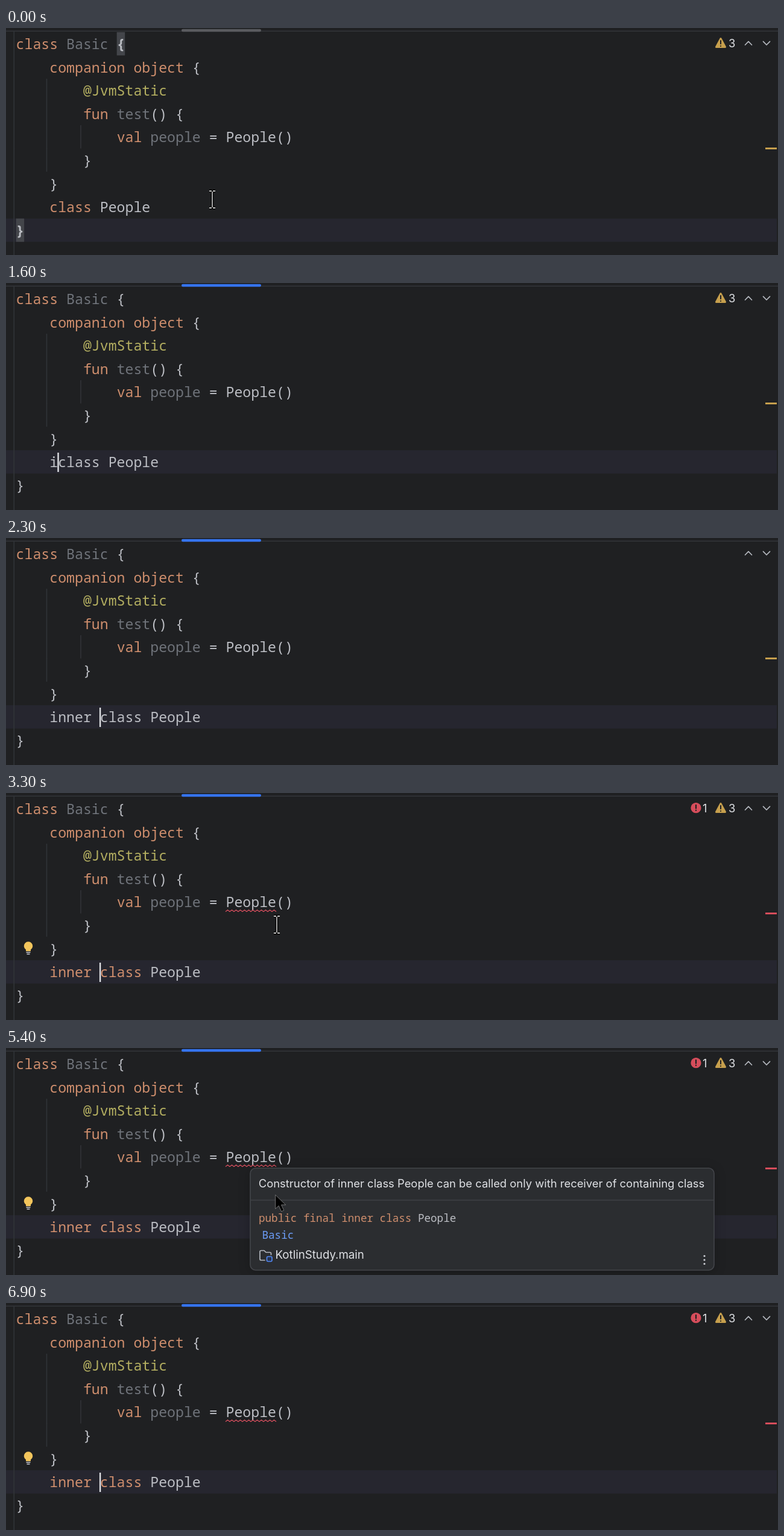
Recreate the animation shown at these times as an HTML page. Size 1280 px wide and 376 px high, loop 7100 ms.

```html
<!DOCTYPE html>
<html lang="en">
<head>
<meta charset="utf-8">
<title>Editor</title>
<style>
  html, body { margin: 0; width: 100%; height: 100%; overflow: hidden; background: #1f2022; }
  svg { display: block; width: 100vw; height: 100vh; }
  text { white-space: pre; fill: #bcbec4; }
  .code { font: 23.2px "Noto Sans Mono", "DejaVu Sans Mono", monospace; }
  .doc { font: 17.6px "Noto Sans Mono", "DejaVu Sans Mono", monospace; }
  .ui { font: 18.4px Inter, "Open Sans", sans-serif; fill: #dfe1e5; }
  .module { font-size: 18.7px; }
  .bold { font-weight: bold; }
  .k { fill: #cf8e6d; }
  .u { fill: #6f737a; }
  .a { fill: #b3ae60; }
  .b { fill: #548af7; }
  .guide { stroke: #313438; stroke-width: 1.6; }
  .popup { fill: #2b2d30; stroke: #43454a; stroke-width: 1.6; filter: drop-shadow(0 3px 9px rgba(0, 0, 0, .22)); }
  .line { fill: none; stroke: #b4b8bf; stroke-width: 1.7; stroke-linecap: round; stroke-linejoin: round; }
</style>
</head>
<body>
<svg viewBox="0 0 1280 376">
  <rect width="1280" height="376" fill="#1f2022"/>
  <rect id="row" width="1278" height="38.6" fill="#26262f"/>
  <path class="guide" d="M13.3 6V376M67.5 84V238M124 161V199.5"/>
  <rect y="4.5" width="1280" height="1.2" fill="#393b40"/>
  <rect id="tab" x="291" y="1.7" width="132" height="4.6" rx="2.2"/>
  <g id="braces" fill="#43454a">
    <rect x="183.7" y="6.8" width="13.5" height="38.6"/>
    <rect x="16.6" y="315.6" width="13.5" height="38.6"/>
  </g>
  <g id="code" class="code"></g>
  <polyline id="squiggle" fill="none" stroke="#db4f5f" stroke-width="1.2"/>
  <rect id="caret" y="281" width="2.4" height="32" fill="#dfe1e5"/>
  <rect id="stripe" x="1259" y="198" width="19" height="3"/>

  <g id="errors">
    <circle cx="1144" cy="24.7" r="8.6" fill="#d64d5b"/>
    <path d="M1144 20V25.5M1144 28.7V29" stroke="#1f2022" stroke-width="2.2" stroke-linecap="round"/>
    <text class="ui" x="1155" y="31.5">1</text>
  </g>
  <g id="warnings">
    <path d="M1185 17.5L1192.5 31.5H1177.5Z" fill="#c69f4d" stroke="#c69f4d" stroke-width="3" stroke-linejoin="round"/>
    <path d="M1185 21V26.3M1185 29.7V30" stroke="#1f2022" stroke-width="2" stroke-linecap="round"/>
    <text class="ui" x="1198" y="31.5">3</text>
  </g>
  <path class="line" d="M1225.5 28L1231 22.3L1236.5 28M1255.5 22.3L1261 28L1266.5 22.3"/>

  <g id="bulb">
    <path d="M33 262V259.5A7.2 7.2 0 1 1 41 259.5V262Z" fill="#f2c55c"/>
    <path d="M33.5 264H40.5M34.5 266.8H39.5" stroke="#ced0d6" stroke-width="1.5"/>
  </g>

  <g id="completion">
    <rect class="popup" x="34" y="315.5" width="843.5" height="90" rx="9"/>
    <rect x="39" y="320" width="833" height="34.5" rx="5.5" fill="#45464a"/>
    <text class="code bold" x="78.8" y="346.5"><tspan class="b">in</tspan>ner</text>
    <text class="code bold" x="78.8" y="381.5"><tspan class="b">in</tspan>line</text>
  </g>

  <g id="beam" fill="none">
    <path d="M-5-14H5M-5 14H5M0-14V14" stroke="#000" stroke-width="4.4"/>
    <path d="M-5-14H-1M1-14H5M-5 14H-1M1 14H5M0-13V13" stroke="#fff" stroke-width="1.3"/>
  </g>

  <g id="hint">
    <rect class="popup" x="405" y="199" width="769" height="169" rx="9"/>
    <path d="M405 252H1174" stroke="#3e4045" stroke-width="1.4"/>
    <text class="ui" x="418.8" y="231">Constructor of inner class People can be called only with receiver of containing class</text>
    <text class="doc" x="419" y="287.7"><tspan class="k">public final inner class</tspan> People</text>
    <text class="doc" x="424.5" y="316"><tspan style="fill:#6c9df8">Basic</tspan></text>
    <path class="line" d="M429 351.5H423Q421 351.5 421 349.5V337.5Q421 335.5 423 335.5H428L431 338.5H437.5Q439.5 338.5 439.5 340.5V342.5"/>
    <rect x="432.5" y="345.5" width="8.5" height="8" rx="2" fill="#25324d" stroke="#548af7" stroke-width="1.6"/>
    <text class="ui module" x="446.5" y="349">KotlinStudy.main</text>
    <g fill="#ced0d6">
      <circle cx="1158" cy="344.5" r="1.6"/><circle cx="1158" cy="351" r="1.6"/><circle cx="1158" cy="357.5" r="1.6"/>
    </g>
  </g>

  <path id="arrow" d="M0 0V23L5.5 18L10 27.5L14 25.5L9.8 16.5H17Z" fill="#000" stroke="#b0b0b0" stroke-width=".6"/>
</svg>
<script>
const LOOP = 7100, STEP = 100, CHAR = 13.92, LINE = 38.6, LEFT = 16.6;
const $ = id => document.getElementById(id);
const span = (cls, text) => `<tspan class="${cls}">${text}</tspan>`;
const show = (id, on) => $(id).style.display = on ? '' : 'none';

// Each line: indent in characters, then markup.
const source = [
  [0, `${span('k', 'class')} ${span('u', 'Basic')} <tspan id="open">{</tspan>`],
  [4, `${span('k', 'companion object')} {`],
  [8, span('a', '@JvmStatic')],
  [8, `${span('k', 'fun')} ${span('u', 'test')}() {`],
  [12, `${span('k', 'val')} ${span('u', 'people')} = People()`],
  [8, '}'],
  [4, '}'],
  [4, '<tspan id="edited"></tspan>'],
  [0, '<tspan id="close">}</tspan>']
];
$('code').innerHTML = source.map(([indent, markup], i) =>
  `<text x="${LEFT + indent * CHAR}" y="${35 + i * LINE}">${markup}</text>`).join('');

$('squiggle').setAttribute('points',
  Array.from({ length: 25 }, (_, i) => `${364 + i * 3.5},${i % 2 ? 193.8 : 196.5}`).join(' '));

// Edited line: start time, markup, caret column.
const edits = [
  [0, `${span('k', 'class')} People`, 0],
  [1600, 'iclass People', 1],
  [1700, 'inclass People', 2],
  [2300, 'inner class People', 6],
  [2500, `${span('k', 'inner class')} People`, 6]
];
const caretToggles = [800, 1300, 1600, 2200, 2300, 3400, 3800, 4400, 4900, 5400, 5900, 6400, 6900];

// Pointer: time, x, y.
const pointer = [
  [0, 342, 284], [200, 290, 286], [400, 180, 294], [600, 98, 302], [800, 80, 304],
  [1000, 108, 309], [2700, 108, 309], [2900, 220, 355], [3000, 300, 352],
  [3200, 425, 258], [3300, 449, 218], [3500, 408, 200], [3700, 404, 196], [5200, 404, 196],
  [5300, 415, 216], [5600, 510, 298], [5700, 510, 298], [5900, 476, 322],
  [6100, 427, 347], [6300, 404, 385], [LOOP, 404, 385]
];

function pointerAt(t) {
  const i = pointer.findIndex(p => p[0] > t);
  const [t0, x0, y0] = pointer[i - 1], [t1, x1, y1] = pointer[i];
  const f = (t - t0) / (t1 - t0);
  return [x0 + (x1 - x0) * f, y0 + (y1 - y0) * f];
}

function draw(t) {
  const focused = t >= 800, failed = t >= 2500;
  const [, markup, column] = edits.findLast(e => e[0] <= t);
  if ($('edited').dataset.markup !== markup) {
    $('edited').innerHTML = markup;
    $('edited').dataset.markup = markup;
  }
  $('row').setAttribute('y', 6.8 + LINE * (focused ? 7 : 8));
  $('tab').setAttribute('fill', focused ? '#3574f0' : '#5a5b5f');
  $('stripe').setAttribute('fill', failed ? '#d64d5b' : '#c69f4d');
  $('open').setAttribute('class', focused ? '' : 'bold');
  $('close').setAttribute('class', focused ? '' : 'bold');
  $('caret').setAttribute('x', 71.4 + column * CHAR);

  show('braces', !focused);
  show('caret', caretToggles.filter(c => c <= t).length % 2);
  show('squiggle', failed);
  show('warnings', t < 2300 || t >= 2800);
  show('errors', t >= 2800);
  show('bulb', t >= 2800);
  show('completion', t >= 1800 && t < 2300);
  show('hint', t >= 4300 && t < 6400);
  show('beam', t < 1600 || t >= 2800 && t < 5300);
  show('arrow', t >= 5300 && t < 6300);
  const place = `translate(${pointerAt(t)})`;
  $('beam').setAttribute('transform', place);
  $('arrow').setAttribute('transform', place);
}

const start = performance.now();
function tick() {
  const t = (performance.now() - start) % LOOP;
  draw(Math.floor(t / STEP) * STEP);
  requestAnimationFrame(tick);
}
tick();
</script>
</body>
</html>
```
